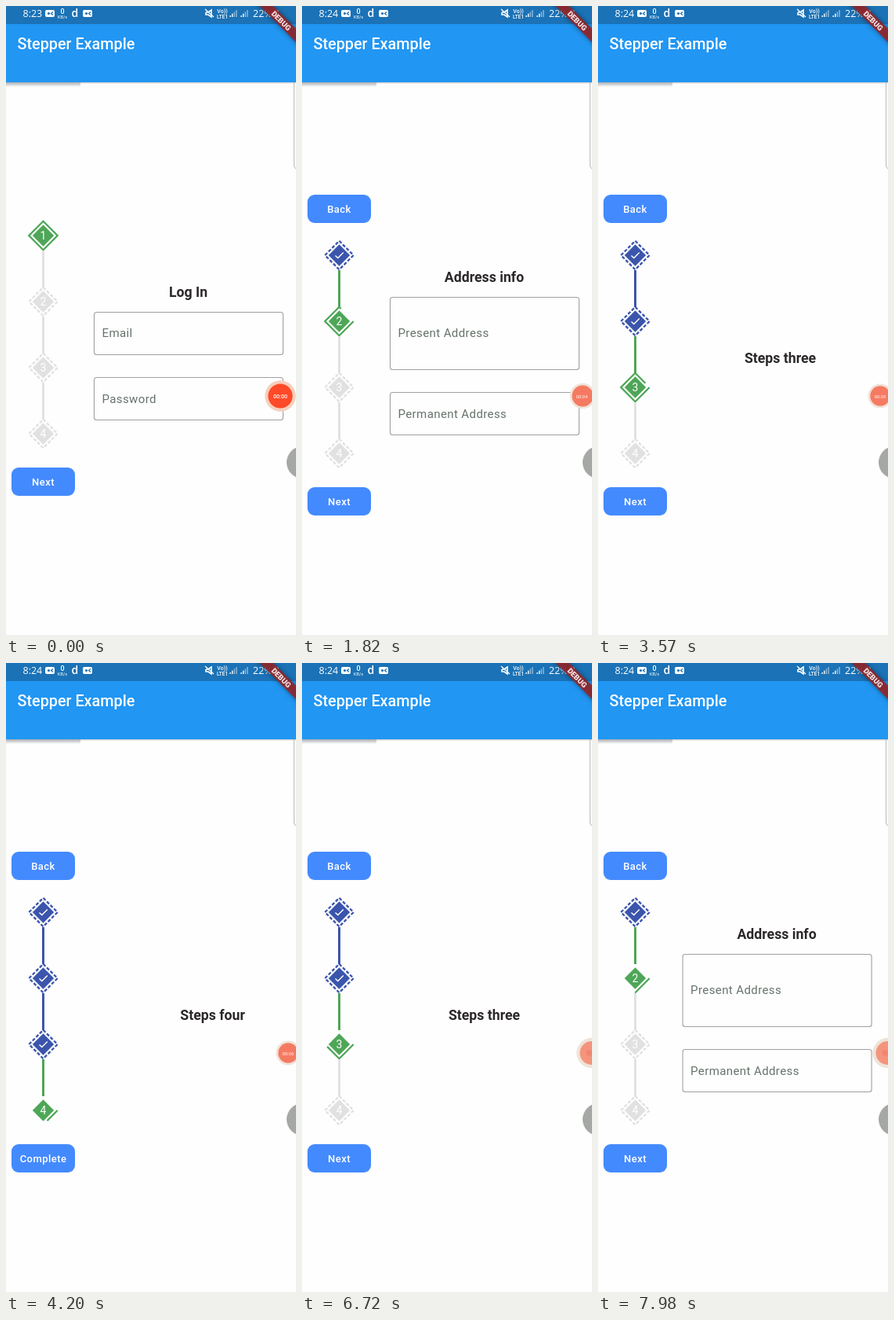
An HTML page with a canvas for the animation above (8000 ms loop, 370x800 px).

```html
<!DOCTYPE html>
<html lang="en">
<head>
<meta charset="utf-8">
<title>Stepper Example</title>
<style>
html, body { margin: 0; width: 100%; height: 100%; overflow: hidden; background: #fefefe; }
canvas { display: block; width: 370px; height: 800px; }
</style>
</head>
<body>
<canvas id="stage"></canvas>
<script>
const W = 370, H = 800, LOOP = 8000;
const PAGE_MS = 450, BORDER_MS = 1500;
const PAGE_X = 95, PAGE_W = W - PAGE_X;
const STEP_X = 47.5, STEP_GAP = 84;
const BLUE = '#3b55ad', GREEN = '#4ea657', GREY = '#e1e1e1';
// Each move: start time and the step that becomes active.
const moves = [[650, 1], [2180, 2], [3930, 3], [6030, 2], [7605, 1]];

const canvas = document.getElementById('stage');
const ctx = canvas.getContext('2d');
const ratio = window.devicePixelRatio || 1;
canvas.width = W * ratio;
canvas.height = H * ratio;

const clamp = v => Math.max(0, Math.min(1, v));
const mix = (a, b, k) => a + (b - a) * k;

// cubic-bezier(.25, .1, .25, 1)
function ease(x) {
  if (x <= 0 || x >= 1) return clamp(x);
  const bez = (a, b, u) => 3 * a * u * (1 - u) ** 2 + 3 * b * u * u * (1 - u) + u ** 3;
  let lo = 0, hi = 1;
  for (let i = 0; i < 24; i++) {
    const mid = (lo + hi) / 2;
    if (bez(.25, .25, mid) < x) lo = mid; else hi = mid;
  }
  return bez(.1, 1, lo);
}

function text(str, x, y, size, { weight = 400, color = '#fff', align = 'left', spacing = 0, family = 'Roboto' } = {}) {
  ctx.font = `${weight} ${size}px ${family}, sans-serif`;
  ctx.letterSpacing = spacing + 'px';
  ctx.textAlign = align;
  ctx.fillStyle = color;
  ctx.fillText(str, x, y);
}

function rect(x, y, w, h, color) {
  ctx.fillStyle = color;
  ctx.fillRect(x, y, w, h);
}

function roundRect(x, y, w, h, r) {
  ctx.beginPath();
  ctx.roundRect(x, y, w, h, r);
}

function disc(x, y, r, color) {
  ctx.beginPath();
  ctx.arc(x, y, r, 0, Math.PI * 2);
  ctx.fillStyle = color;
  ctx.fill();
}

function polyline(points, color, width) {
  ctx.beginPath();
  points.forEach(([x, y]) => ctx.lineTo(x, y));
  ctx.strokeStyle = color;
  ctx.lineWidth = width;
  ctx.stroke();
}

function diamond(y, r) {
  ctx.beginPath();
  ctx.moveTo(STEP_X + r, y);
  ctx.lineTo(STEP_X, y + r);
  ctx.lineTo(STEP_X - r, y);
  ctx.lineTo(STEP_X, y - r);
  ctx.closePath();
}

function button(label, y) {
  roundRect(7, y, 81, 36, 9);
  ctx.fillStyle = '#448aff';
  ctx.fill();
  text(label, STEP_X, y + 22.5, 13, { weight: 500, align: 'center', spacing: .45 });
}

function drawStep(i, y, active, progress) {
  const color = i < active ? BLUE : i === active ? GREEN : GREY;
  const r = 18.2, perimeter = 4 * r * Math.SQRT2;
  diamond(y, 13.7);
  ctx.fillStyle = color;
  ctx.fill();

  diamond(y, r);
  ctx.strokeStyle = color;
  ctx.lineWidth = 2.3;
  if (i !== active) ctx.setLineDash([4.2, perimeter / 16 - 4.2]);
  else if (progress < 1) ctx.setLineDash([perimeter * progress, perimeter]);
  ctx.stroke();
  ctx.setLineDash([]);

  if (i < active) polyline([[42.5, y + .5], [45.8, y + 3.5], [52.8, y - 3.5]], '#fff', 1.4);
  else text(i + 1, STEP_X, y + 5, 14, { align: 'center' });

  if (i < 3) {
    const line = i + 1 < active ? BLUE : i + 1 === active ? GREEN : GREY;
    rect(STEP_X - 1.5, y + 19, 3, 47, line);
  }
}

function drawStepper(active, progress, t) {
  const top = active ? 317 : 292;
  if (t > 5460 && t < 6000) rect(0, 240, 95, 43, '#f9f9f9');
  if (active) button('Back', 240);
  for (let i = 0; i < 4; i++) drawStep(i, top + i * STEP_GAP, active, progress);
  button(active === 3 ? 'Complete' : 'Next', top + 295);
}

function field(label, y, h, baseline) {
  roundRect(112.5, y, 241, h, 3);
  ctx.strokeStyle = '#a0a0a0';
  ctx.lineWidth = 1.1;
  ctx.stroke();
  text(label, 122.5, baseline, 15, { color: '#65736a', spacing: .4 });
}

const heading = (str, y) =>
  text(str, PAGE_X + PAGE_W / 2, y, 17.7, { weight: 700, color: '#2c2829', align: 'center' });

const pages = [
  () => {
    heading('Log In', 370);
    field('Email', 389.5, 54, 420.5);
    field('Password', 472.5, 54, 504.5);
  },
  () => {
    heading('Address info', 351);
    field('Present Address', 370.5, 92, 420.5);
    field('Permanent Address', 491.5, 54, 523.5);
  },
  () => heading('Steps three', 453.5),
  () => heading('Steps four', 453.5)
];

function drawPages(position) {
  ctx.save();
  ctx.beginPath();
  ctx.rect(PAGE_X, 97, PAGE_W, H - 97);
  ctx.clip();
  pages.forEach((draw, i) => {
    if (Math.abs(i - position) >= 1) return;
    ctx.save();
    ctx.translate((i - position) * PAGE_W, 0);
    draw();
    ctx.restore();
  });
  ctx.restore();
}

function camera(x) {
  roundRect(x, 5, 12, 9, 2);
  ctx.fillStyle = '#fff';
  ctx.fill();
  disc(x + 4.5, 9.5, 1.6, '#1b72b6');
  polyline([[x + 10, 7.5], [x + 7.5, 9.5], [x + 10, 11.5]], '#1b72b6', 1.3);
}

function signal(x) {
  for (let i = 0; i < 4; i++) rect(x + i * 2.6, 12 - i * 2.3, 1.4, 2 + i * 2.3, i < 2 ? '#fff' : '#8fbbdd');
}

function drawBars(clock) {
  const shade = (x, w, h, alpha) => {
    const g = ctx.createLinearGradient(0, 97, 0, 97 + h);
    g.addColorStop(0, `rgba(40,50,60,${alpha})`);
    g.addColorStop(1, 'rgba(40,50,60,0)');
    rect(x, 97, w, h, g);
  };
  shade(0, PAGE_X, 6, .4);
  shade(PAGE_X, PAGE_W, 2.5, .25);
  rect(0, 23, W, 74, '#2196f3');
  rect(0, 0, W, 23, '#1b72b6');
  text('Stepper Example', 14.5, 55, 19.8, { weight: 500 });

  const hand = { family: 'Open Sans' };
  text(clock, 21.5, 14, 12.5, hand);
  camera(50);
  text('0', 72, 10, 9, { weight: 500, align: 'center' });
  text('KB/s', 72, 15.5, 5.5, { align: 'center' });
  text('d', 83.5, 14, 14, { weight: 600, ...hand });
  camera(98);

  polyline([[255, 8], [258, 8], [262, 5], [262, 14], [258, 11], [255, 11], [255, 8]], '#fff', 1.6);
  polyline([[254, 4], [265, 14]], '#fff', 1.2);
  text('Vo))', 276, 9, 7, { weight: 500, align: 'center' });
  text('LTE1', 276, 15.5, 6.5, { weight: 500, align: 'center' });
  signal(285.5);
  signal(299.5);
  text('22%', 315, 14, 12.5, hand);
  roundRect(340, 5, 8, 10, 2);
  ctx.fillStyle = '#e8eef4';
  ctx.fill();
}

function drawBanner() {
  ctx.save();
  ctx.translate(351.2, 18.8);
  ctx.rotate(Math.PI / 4);
  ctx.shadowColor = 'rgba(0,0,0,.5)';
  ctx.shadowBlur = 6 * ratio;
  rect(-50, -6, 100, 12, 'rgba(145,38,45,.92)');
  ctx.shadowBlur = 0;
  text('DEBUG', 0, 3.5, 9.6, { weight: 900, align: 'center', color: '#f3e6e6' });
  ctx.restore();
}

function drawFloating(t) {
  ctx.save();
  ctx.beginPath();
  ctx.rect(360, 97, 10, 120);
  ctx.clip();
  roundRect(367.5, 80, 20, 127, 4);
  ctx.strokeStyle = '#b9b9b9';
  ctx.lineWidth = 1;
  ctx.stroke();
  ctx.restore();

  disc(378.5, 580.5, 20.5, '#a6a8a6');

  const started = t >= 650;
  const dock = clamp((t - 4700) / 300);
  if (!started) {
    disc(350, 496, 19.7, '#f6d0bd');
    disc(350, 496, 15.6, '#ff4a29');
  } else {
    const x = t < 2200 ? 358 : mix(360, 369.5, dock);
    const r = mix(t < 2200 ? 13.5 : 12.7, 15, dock);
    disc(x, 496, r + mix(2.8, 4.2, dock), '#efe3d9');
    disc(x, 496, r, dock ? '#f4947c' : '#f67a62');
    if (dock === 1) disc(x - 3, 496, 4, '#f28670');
  }
  if (dock === 0) {
    const seconds = started ? Math.floor(2.4 + t / 1000) : 0;
    text('00:0' + seconds, started ? (t < 2200 ? 357 : 360) : 350, 498.5, started ? 5.8 : 7,
      { weight: 500, align: 'center', color: started ? '#ffe0d8' : '#fff' });
  }
}

function render(t) {
  let active = 0, position = 0, progress = 1;
  for (const [start, step] of moves) {
    if (t < start) break;
    position = mix(active, step, ease((t - start) / PAGE_MS));
    progress = clamp((t - start) / BORDER_MS);
    active = step;
  }
  ctx.setTransform(ratio, 0, 0, ratio, 0, 0);
  rect(0, 0, W, H, '#fefefe');
  drawStepper(active, progress, t);
  drawPages(position);
  drawBars(t < 650 ? '8:23' : '8:24');
  drawFloating(t);
  drawBanner();
}

const origin = performance.now();
function tick() {
  render((performance.now() - origin) % LOOP);
  requestAnimationFrame(tick);
}
tick();
</script>
</body>
</html>
```
